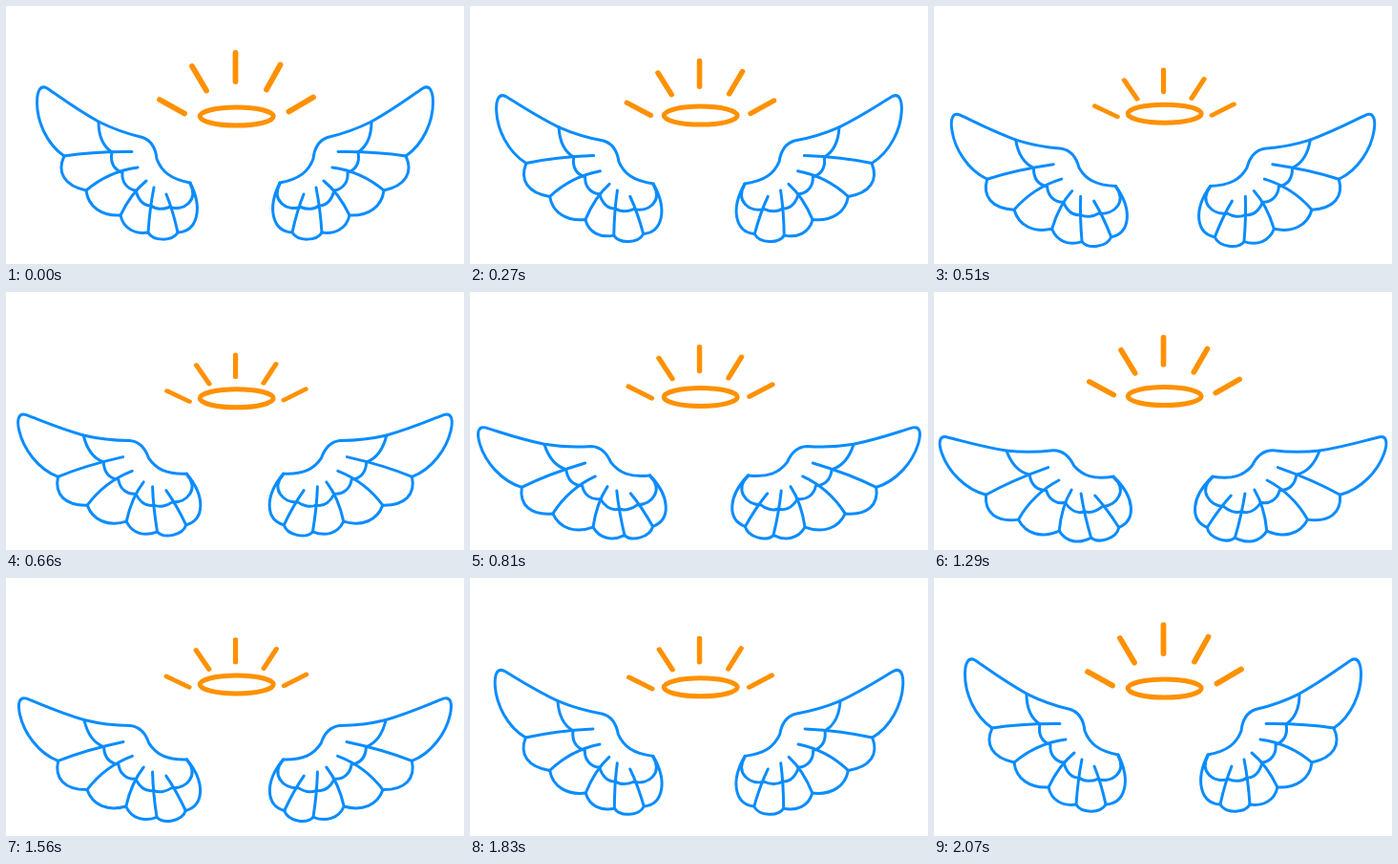
Animation, 480 px wide and 270 px high, one loop 2100 ms. Source, as an HTML page:

```html
<!DOCTYPE html>
<html lang="en">
<head>
<meta charset="utf-8">
<title>Wings and halo</title>
<style>
  html, body { margin: 0; width: 100%; height: 100%; overflow: hidden; background: #fff; }
  svg { display: block; width: 100vw; height: 100vh; }
  path, ellipse { fill: none; stroke-linecap: round; stroke-linejoin: round; }
  .wing { stroke: #0a8cff; stroke-width: 3; }
  .gold { stroke: #ff9100; }
</style>
</head>
<body>
<svg viewBox="0 0 480 270">
  <defs>
    <g id="wing" class="wing">
      <!-- upper edge and shoulder -->
      <path d="M61 157C42 144 32.5 120 32.5 101C32.5 89 36 82 43 86C58 96 72 107 97 121C113 129 128 134 143 137.5C153 141 157 150 158 160C163 173 172 181 193 185"/>
      <!-- feather tips -->
      <path d="M61 157C53 174 61 188 84 193C86 210 100 220 120 219C123 233 135 239 149 237C154 246 174 247 180 237C200 236 207 213 193 185"/>
      <!-- ribs -->
      <path d="M61 157Q92 152 132 152.5M84 193C97 182 116 172 138 169M120 219Q131 196 147 183M149 237C150 222 152 205 155 190M180 237Q175 214 168 197"/>
      <!-- coverts -->
      <path d="M97 121C97 136 102 147 111 153C109 164 113 171 122 174.5C121 184 127 192 136 193C139 204 145 209 152 209C157 213 165 213 171 210.5C187 215 202 203 193 186"/>
    </g>
  </defs>
  <g id="left"><use href="#wing"/></g>
  <g transform="translate(480 0) scale(-1 1)"><g id="right"><use href="#wing"/></g></g>
  <g id="rays">
    <path class="gold" stroke-width="5.8" d="M161 98L187 112.5M195 63L210 88.5M240.5 49V79M287.5 61.5L273 87.5M322 95.5L296.5 110.5"/>
  </g>
  <g id="halo"><ellipse class="gold" stroke-width="5" cx="241.7" cy="115.5" rx="38.5" ry="9.5"/></g>
</svg>
<script>
const LOOP = 2100, STEP = 30;

// [time in ms, value], eased between entries
const flap = [[0, 0], [1140, 21.4], [2090, 0], [LOOP, 0]];
const shine = [[0, 1], [600, 0], [1110, 1], [1680, 0], [2090, 1], [LOOP, 1]];

const byId = id => document.getElementById(id);
const [left, right, rays, halo] = ['left', 'right', 'rays', 'halo'].map(byId);

function ease(keys, t) {
  const i = keys.findIndex(k => k[0] > t);
  const [t0, a] = keys[i - 1], [t1, b] = keys[i];
  return a + (b - a) * (1 - Math.cos(Math.PI * (t - t0) / (t1 - t0))) / 2;
}

function draw() {
  const t = Math.floor(performance.now() % LOOP / STEP) * STEP;
  const angle = ease(flap, t);
  const lift = -0.32 * angle;
  const sy = 0.76 + 0.24 * ease(shine, t);
  const sx = 1 - 0.42 * (1 - sy);

  for (const wing of [left, right]) {
    wing.setAttribute('transform', `rotate(${-angle} 213.5 203)`);
  }
  halo.setAttribute('transform', `translate(0 ${lift})`);
  rays.setAttribute('transform',
    `translate(241 ${140 + lift}) scale(${sx} ${sy}) translate(-241 -140)`);
  requestAnimationFrame(draw);
}
draw();
</script>
</body>
</html>
```
